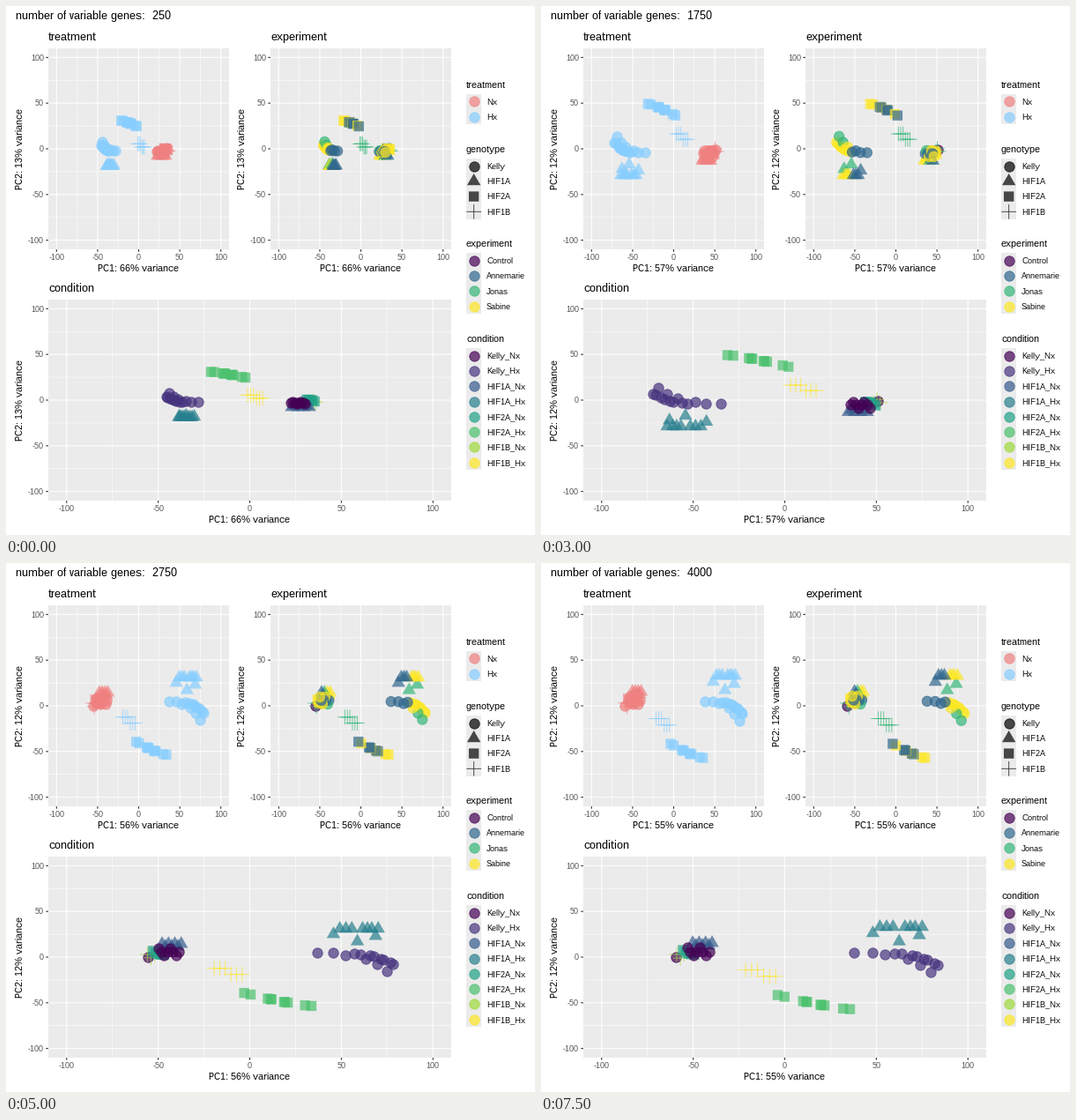
Animation, 600 px wide and 600 px high, one loop 8 s. Source, as a matplotlib script:

```python
import math

import numpy as np
import matplotlib.pyplot as plt
from matplotlib.animation import FuncAnimation
from matplotlib.collections import PathCollection
from matplotlib.patches import Rectangle
from matplotlib.path import Path
from matplotlib.transforms import IdentityTransform

SIZE, DPI = 600, 72
FRAMES, STEP = 16, 250
FLIP_FROM = 2250  # gene count at which both components change sign
ALPHA = 0.7
GREY, DARK, TICK_TEXT = "#EBEBEB", "#333333", "#4D4D4D"
BIG, MID, SMALL = 13, 11, 9

# Whole-pixel hinting gives integer letter advances.
plt.rcParams.update({"font.family": "Liberation Sans",
                     "text.hinting": "native", "text.hinting_factor": 1})

TREATMENT = {"Nx": "#F08080", "Hx": "#87CEFF"}
EXPERIMENT = {"Control": "#440154", "Annemarie": "#31688E",
              "Jonas": "#35B779", "Sabine": "#FDE725"}
CONDITION = {"Kelly_Nx": "#440154", "Kelly_Hx": "#46337E",
             "HIF1A_Nx": "#365C8D", "HIF1A_Hx": "#277F8E",
             "HIF2A_Nx": "#1FA187", "HIF2A_Hx": "#4AC16D",
             "HIF1B_Nx": "#9FDA3A", "HIF1B_Hx": "#FDE725"}
BY_INITIAL = {name[0]: color for name, color in EXPERIMENT.items()}

R = 5.69
ARM = math.sqrt(2) * R
SHAPES = {
    "Kelly": Path.circle((0, 0), R),
    "HIF1A": Path([(0, 1.555 * R), (1.347 * R, -0.778 * R),
                   (-1.347 * R, -0.778 * R), (0, 0)], closed=True),
    "HIF2A": Path([(-R, -R), (R, -R), (R, R), (-R, R), (0, 0)], closed=True),
    "HIF1B": Path([(-ARM, 0), (ARM, 0), (0, -ARM), (0, ARM)],
                  [Path.MOVETO, Path.LINETO] * 2),
}

fig = plt.figure(figsize=(SIZE / DPI, SIZE / DPI), dpi=DPI, facecolor="white")
ax = fig.add_axes([0, 0, 1, 1])
ax.set_xlim(0, SIZE)
ax.set_ylim(SIZE, 0)
ax.axis("off")


def label(x, y, s, size=MID, color="black", **kw):
    return ax.text(x, y, s, fontsize=size, color=color, va="baseline", **kw)


def line(xs, ys, color, lw, zorder):
    ax.plot(xs, ys, color=color, lw=lw, zorder=zorder, snap=False,
            solid_capstyle="butt")


def box(x, y, w, h):
    ax.add_patch(Rectangle((x, y), w, h, fc=GREY, ec="none", zorder=0))


def marks(genotype, xy, colors):
    """Add one batch of markers at pixel positions."""
    filled = genotype != "HIF1B"
    outlined = genotype in ("Kelly", "HIF1B")
    c = PathCollection([SHAPES[genotype]], offsets=xy, offset_transform=ax.transData,
                       transform=IdentityTransform(), alpha=ALPHA, zorder=3,
                       facecolors=colors if filled else "none",
                       edgecolors=colors if outlined else "none",
                       linewidths=0.94, capstyle="round")
    c.set_snap(False)
    ax.add_collection(c, autolim=False)
    return c


class Panel:
    def __init__(self, x, y, w, h, title):
        self.cx, self.cy = x + w / 2, y + h / 2
        self.sx, self.sy = w / 220, h / 220
        box(x, y, w, h)
        label(x, y - 9, title, BIG)
        for v in range(-100, 101, 25):
            px, py = self.to_px(v, v)
            major = v % 50 == 0
            lw = 1.07 if major else 0.53
            line([px, px], [y, y + h], "white", lw, 1)
            line([x, x + w], [py, py], "white", lw, 1)
            if major:
                line([px, px], [y + h, y + h + 2.75], DARK, lw, 2)
                line([x - 2.75, x], [py, py], DARK, lw, 2)
                label(px, y + h + 12, str(v), SMALL, TICK_TEXT, ha="center")
                label(x - 5, py + 3.2, str(v), SMALL, TICK_TEXT, ha="right")
        self.xlab = label(self.cx, y + h + 25, "", ha="center")
        self.ylab = label(x - 29, self.cy, "", ha="center",
                          rotation=90, rotation_mode="anchor")

    def to_px(self, u, v):
        return self.cx + u * self.sx, self.cy - v * self.sy


def legend(y, title, entries):
    """entries: (text, genotype shape, color); y is the centre of the first key."""
    key = 17.28
    label(522, y - 15.5, title)
    for k, (text, shape, color) in enumerate(entries):
        yk = y + key * k
        box(522, yk - key / 2, key, key)
        marks(shape, [(522 + key / 2, yk)], color)
        label(545, yk + 3.2, text, SMALL)


panels = [Panel(48, 48, 205, 228, "treatment"),
          Panel(300, 48, 205, 228, "experiment"),
          Panel(48, 333, 457, 228, "condition")]
heading = label(11, 15, "", BIG)

legend(108.4, "treatment", [(t, "Kelly", c) for t, c in TREATMENT.items()])
legend(181.5, "genotype", [(g, g, "black") for g in SHAPES])
legend(288.8, "experiment", [(e, "Kelly", c) for e, c in EXPERIMENT.items()])
legend(396.8, "condition", [(n, "Kelly", c) for n, c in CONDITION.items()])


# Cluster outlines: k is the sample index, u runs 0..1 from left to right.
def hook(k, u):
    sway = np.cos(2 * np.pi * (k - 2) / 3)
    return 0.55 * u + 0.45 * u**6, 0.65 * (1 - u)**2 - 0.25 * u + 0.45 * (1 - u) * sway


def peaks(k, u):
    return u**1.3, (k % 4 == 1) * (1 - 1.2 * abs(u - 0.5))


def slope(k, u):
    x = u + 0.07 * (np.sin(2 * np.pi * u) - np.sin(6 * np.pi * u))
    return x, 1 - x**1.3


def two_rows(k, u):
    return u, 1.0 * (u < 0.5)


def zigzag(k, u):
    return u, k % 2


def wave(k, u):
    return u, 0.5 + 0.5 * np.cos(np.pi * (k - 1) / 2)


def droop(k, u):
    return u, 1 - u**3


groups = []


def group(name, who, outline, first, last):
    """first, last: (left, right, low, high) at the fewest and the most genes."""
    genotype, treatment = name.split("_")
    k = np.arange(len(who))
    local = outline(k, k / max(1, len(who) - 1))

    def place(left, right, low, high):
        return np.column_stack([left + (right - left) * local[0],
                                low + (high - low) * local[1]])

    start, end = place(*first), place(*last)
    colors = [TREATMENT[treatment], [BY_INITIAL[c] for c in who], CONDITION[name]]
    groups.append((start, end, [marks(genotype, start, c) for c in colors]))


group("Kelly_Nx", "C", zigzag, (30.6, 31, -1.9, 0), (59.5, 60, 0, 1))
group("HIF1B_Nx", "JJJ", zigzag, (33.5, 36, -2.5, -1), (55, 59, -3, 1))
group("HIF2A_Nx", "SASSS", droop, (31, 35.4, -1.5, 0.5), (49.4, 55.6, -7.7, -3))
group("HIF1A_Nx", "SSSSJAA", zigzag, (22.9, 32.5, -7.7, -6), (39.7, 50.3, -15.4, -12.5))
group("Kelly_Nx", "AJASASAS", wave, (22.4, 30, -3.9, -1.9), (41.4, 53.2, -10.6, -1.9))
group("HIF1B_Hx", "JJJJJJ", two_rows, (-1.2, 7, 2, 5.5), (5, 21.4, 14, 21))
group("HIF2A_Hx", "SSASASAASA", slope, (-21.2, -2.4, 24.6, 30.9), (-35.6, 3.9, 41.5, 57))
group("HIF1A_Hx", "SJSSSJAAAA", peaks, (-38.8, -30.3, -18.8, -17), (-75, -48.1, -33, -16))
group("Kelly_Hx", "SSJSSJSSSSAAAA", hook, (-45.5, -28.4, 0, 9.6), (-83.5, -38, 0, 20))


def update(i):
    genes = STEP * (i + 1)
    w = math.log(genes / STEP) / math.log(FRAMES)  # spread grows with log(genes)
    sign = -1 if genes >= FLIP_FROM else 1
    pc1 = np.interp(genes, (250, 500, 750, 1750, 2500, 3250),
                    (66, 62, 60, 57.4, 56.6, 55.4))
    pc2 = 13 if genes < 500 else 12
    heading.set_text(f"number of variable genes:  {genes}")
    for p in panels:
        p.xlab.set_text(f"PC1: {pc1:.0f}% variance")
        p.ylab.set_text(f"PC2: {pc2}% variance")
    for start, end, layers in groups:
        pc = sign * (start + (end - start) * w)
        for p, layer in zip(panels, layers):
            layer.set_offsets(np.column_stack(p.to_px(pc[:, 0], pc[:, 1])))
    return []


update(0)
anim = FuncAnimation(fig, update, frames=FRAMES, interval=500, repeat=True,
                     repeat_delay=0, blit=False)
plt.show()
```
